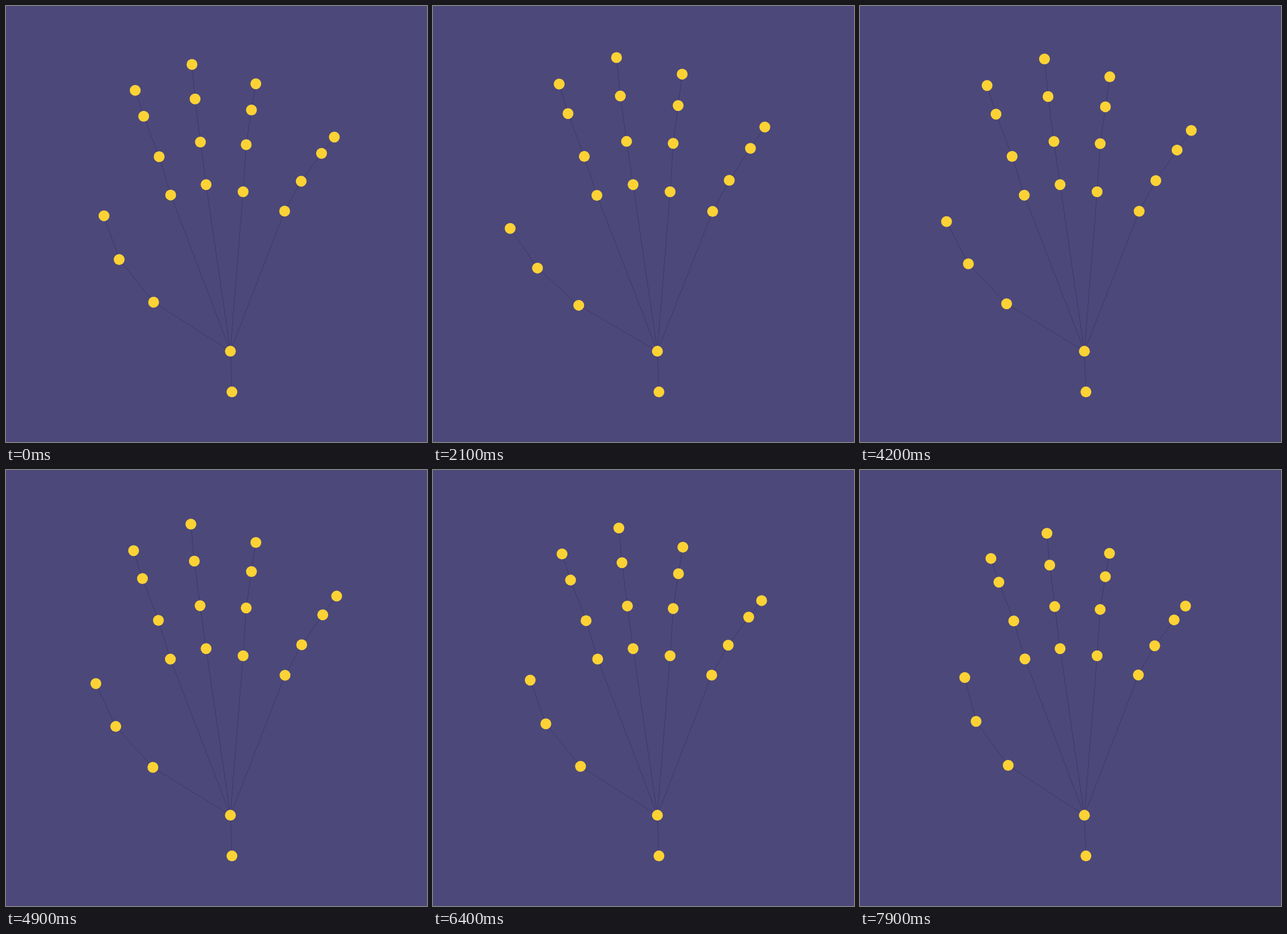
Recreate the animation shown at these times as an HTML page. Size 736x761 px, loop 8 s.

```html
<!DOCTYPE html>
<html lang="en">
<head>
<meta charset="utf-8">
<title>Hand</title>
<style>
  html, body { margin: 0; width: 100%; height: 100%; overflow: hidden; background: #4c487a; }
  svg { display: block; width: 100%; height: 100%; }
  polyline { fill: none; stroke: #3d3868; stroke-width: 1; }
  circle { fill: #fcd235; }
</style>
</head>
<body>
<svg id="stage" viewBox="0 0 736 761"></svg>
<script>
const LOOP = 8000, STEP = 100, REST = 300, REST_POSE = 6560;
const OPEN = 1200, CLOSING = 6700;
const RAD = Math.PI / 180;
const palm = [392.3, 602.6], wrist = [395, 673.6];

// Bones run from the palm outwards; angles are clockwise degrees from upright.
// spread turns the palm bone; drift, plus twist per joint, turns the others.
// curl tips a finger away from the viewer, flat to the picture at time peak.
const fingers = [
  { lengths: [159.2, 97.1, 84.1], angles: [-60.2, -49.8, -37.8],
    spread: 3.4, drift: 13.6, twist: 9.7, curl: 0.65, peak: 0 },
  { lengths: [292, 71.3, 80.1, 53.8], angles: [-21.3, -18.2, -20.8, -16.4],
    spread: 0.44, drift: 1.8, twist: -2, curl: 0.9, peak: 0.1 },
  { lengths: [294, 76.2, 80, 67.4], angles: [-8.31, -8.8, -8, -5.8],
    spread: 0, drift: 1.5, twist: -0.35, curl: 0.92, peak: 0.15 },
  { lengths: [279.3, 84.7, 66.6, 55.4], angles: [4.56, 3.6, 7.3, 6.9],
    spread: 0, drift: 0.2, twist: 1.5, curl: 1, peak: 0.05 },
  { lengths: [262.4, 61.7, 67.1, 45.2], angles: [21.67, 28, 33.1, 33.1],
    spread: -0.6, drift: 1.3, twist: 2.55, curl: 1.05, peak: 0 }
];
const bend = i => i ? 5 + 13 * i : 0;

// Joint positions of a finger, palm first; s is 0 when open and 1 when closed.
function joints({ lengths, angles, spread, drift, twist, curl, peak }, s) {
  let [x, y] = palm;
  const points = [palm];
  lengths.forEach((length, i) => {
    const turn = i ? drift + twist * (i - 1) : spread;
    const angle = (angles[i] + turn * s) * RAD;
    const seen = length * Math.cos(bend(i) * curl * (s - peak) * RAD);
    x += seen * Math.sin(angle);
    y -= seen * Math.cos(angle);
    points.push([x, y]);
  });
  return points;
}

const stage = document.getElementById("stage");
const add = (tag, attrs = {}) => {
  const el = document.createElementNS("http://www.w3.org/2000/svg", tag);
  for (const key in attrs) el.setAttribute(key, attrs[key]);
  return stage.appendChild(el);
};
const dot = ([cx, cy] = [0, 0]) => add("circle", { cx, cy, r: 9.5 });

add("polyline", { points: [wrist, palm].join(" ") });
const lines = fingers.map(() => add("polyline"));
const dots = fingers.map(f => f.lengths.map(() => dot()));
dot(palm);
dot(wrist);

function draw(ms) {
  const t = Math.floor(ms % LOOP / STEP) * STEP;
  const s = ((t < REST ? REST_POSE : t) - OPEN) / CLOSING;
  fingers.forEach((finger, i) => {
    const points = joints(finger, s);
    lines[i].setAttribute("points", points.join(" "));
    dots[i].forEach((el, j) => {
      const [x, y] = points[j + 1];
      el.setAttribute("cx", x);
      el.setAttribute("cy", y);
    });
  });
}

const start = performance.now();
function tick() {
  draw(performance.now() - start);
  requestAnimationFrame(tick);
}
tick();
</script>
</body>
</html>
```
